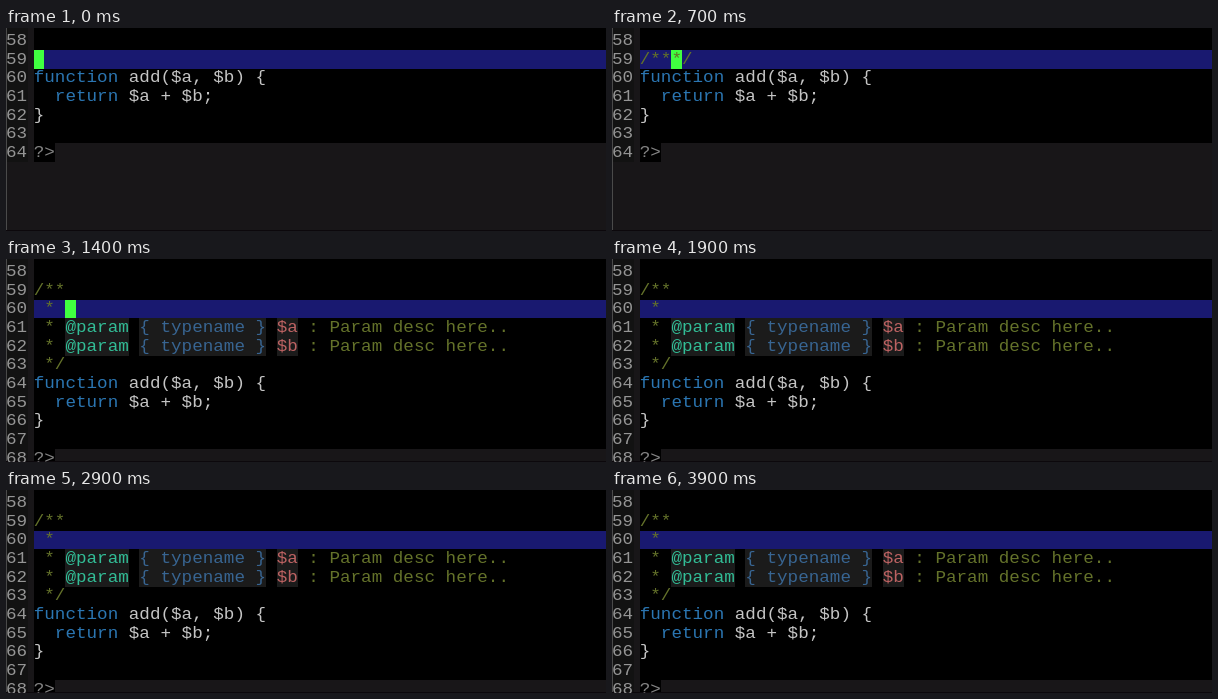
These frames come from a looping animation (600 px wide and 203 px high, 4.1 s). An HTML page:

```html
<!DOCTYPE html>
<html lang="en">
<head>
<meta charset="utf-8">
<title>Doc comment expansion</title>
<style>
  html, body { margin: 0; width: 100%; height: 100%; overflow: hidden; background: #181618; }
  svg { display: block; width: 100%; height: 100%; }
  text { font: 17.6px "Liberation Mono", "Courier New", monospace; white-space: pre; }
</style>
</head>
<body>
<svg id="stage" viewBox="0 0 600 203"></svg>
<script>
const LOOP = 4100;
const CELL = 10.56, ROW = 18.67, LEFT = 27.75, TOP = 3.2, FIRST_LINE = 58;
const SQUASH = 0.89; // the screen is slightly flattened
const color = {
  empty: '#181618', gutter: '#121212', edge: '#4a4a4a', line: '#191970', cursor: '#40ff40',
  region: '#1f6f8b', number: '#959595', plain: '#c4c4c4', keyword: '#2b76b2',
  comment: '#64722a', tag: '#32bd96', type: '#386592', variable: '#bc6262',
  close: '#848484', field: '#1b1b1b'
};
const stage = document.getElementById('stage');

const colX = col => LEFT + col * CELL;
const rowY = row => TOP + row * ROW;
const escapeText = s => s.replace(/&/g, '&amp;').replace(/</g, '&lt;').replace(/>/g, '&gt;');
const rect = (x, y, w, h, fill) =>
  `<rect x="${x}" y="${y}" width="${w}" height="${h}" fill="${fill}" shape-rendering="crispEdges"/>`;
const cells = (row, col, count, fill) => rect(colX(col), rowY(row), count * CELL, ROW, fill);
const label = (x, row, text, fill) =>
  `<text transform="translate(${x} ${rowY(row) + 13.9}) scale(1 ${SQUASH})" fill="${fill}">${escapeText(text)}</text>`;

// A line is a list of [text, style, background] spans.
const addFunction = [
  [['function', 'keyword'], [' add($a, $b) {', 'plain']],
  [['  return', 'keyword'], [' $a + $b;', 'plain']],
  [['}', 'plain']],
  [],
  [['?>', 'close']]
];
const paramLine = name => [
  [' * ', 'comment'], ['@param', 'tag', 'field'], [' ', 'comment'],
  ['{ typename }', 'type', 'field'], [' ', 'comment'], [name, 'variable', 'field'],
  [' : Param desc here..', 'comment']
];
const typedDoc = text => [[], [[text, 'comment']], ...addFunction];
const fullDoc = [
  [], [['/**', 'comment']], [[' *', 'comment']],
  paramLine('$a'), paramLine('$b'), [[' */', 'comment']], ...addFunction
];

function drawLine(spans, row) {
  let col = 0, back = '', front = '';
  for (const [text, style, background] of spans) {
    if (background) back += cells(row, col, text.length, color[background]);
    front += label(colX(col), row, text, color[style]);
    col += text.length;
  }
  return back + front;
}

function drawEditor({ lines, row, col, cursor, region }) {
  const last = lines.length - 1;
  let out = rect(0, 0, 600, 203, color.empty)
    + rect(LEFT, 0, 600 - LEFT, rowY(last), '#000')
    + cells(last, 0, 2, '#000')
    + rect(0, 0, 22, rowY(last + 1), color.gutter)
    + rect(0, 0, 1, 203, color.edge)
    + rect(0, 201.5, 600, 1.5, '#0c080c')
    + rect(LEFT, rowY(row), 600 - LEFT, ROW, color.line);
  if (region) {
    out += cells(row, 1, 3, color.region)
      + rect(colX(4) - 1, rowY(row), 1, ROW, '#5b9fb4');
  }
  if (cursor) out += cells(row, col, 1, color.cursor);
  lines.forEach((spans, i) => {
    out += label(0, i, String(FIRST_LINE + i), color.number) + drawLine(spans, i);
  });
  return out;
}

function editorAt(t) {
  if (t >= 1400) {
    return { lines: fullDoc, row: 2, col: 3, cursor: Math.floor((t - 1400) / 500) % 2 === 0 };
  }
  const [text, col] = t < 200 ? ['', 0]
    : t < 400 ? ['/', 1]
    : t < 600 ? ['/**/', 2]
    : ['/***/', 3];
  return { lines: typedDoc(text), row: 1, col, cursor: t < 1200, region: t >= 900 };
}

let shown = '';
function render(now) {
  const picture = drawEditor(editorAt(now % LOOP));
  if (picture !== shown) stage.innerHTML = shown = picture;
}

const start = performance.now();
function tick() {
  render(performance.now() - start);
  requestAnimationFrame(tick);
}
tick();
</script>
</body>
</html>
```
